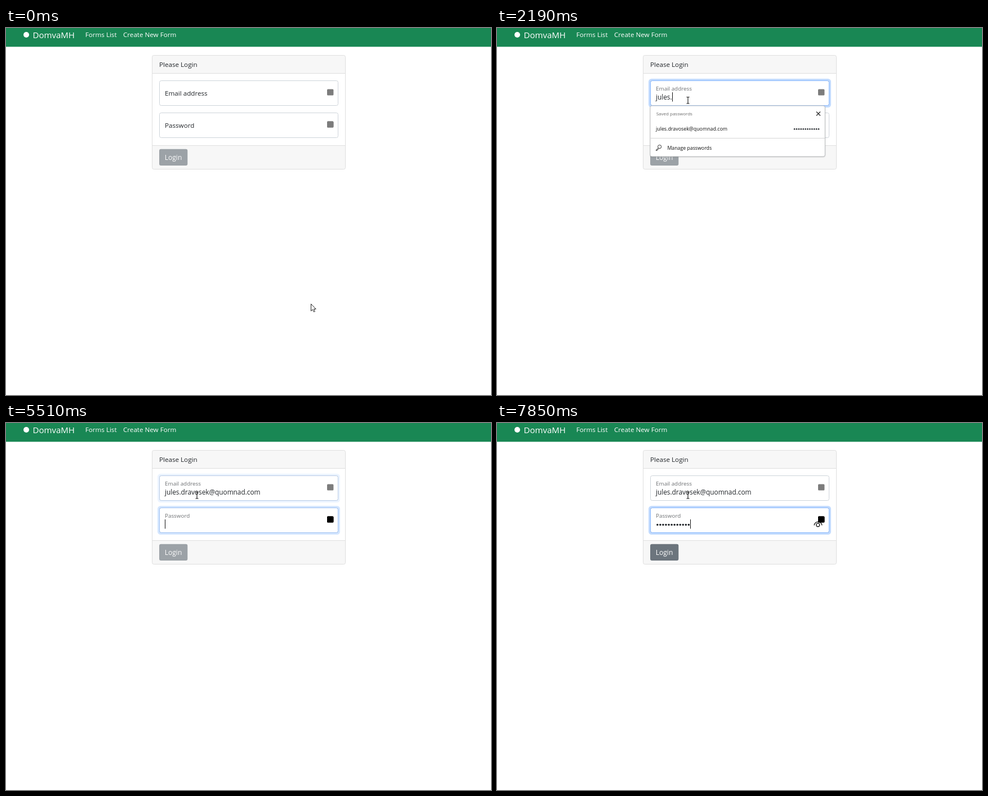
These frames come from a looping animation (861 px wide and 651 px high, 8000 ms). An HTML page:

```html
<!DOCTYPE html>
<html lang="en">
<head>
<meta charset="utf-8">
<title>Login form</title>
<style>
  html, body { margin: 0; width: 100%; height: 100%; overflow: hidden; background: #fff; }
  svg { display: block; width: 100%; height: 100%; }
  text { font-family: 'Open Sans', 'Noto Sans', sans-serif; font-size: 11.65px; fill: #212529; white-space: pre; }
</style>
</head>
<body>
<svg id="stage" viewBox="0 0 861 651"></svg>
<script>
const LOOP = 8000;
const EMAIL = 'jules.dravosek@quomnad.com';
const ALT_EMAIL = 'jules@dravosek.net';
const svg = document.getElementById('stage');

const text = (x, y, str, attrs = '') => `<text x="${x}" y="${y}" ${attrs}>${str}</text>`;
const rect = (x, y, w, h, attrs) => `<rect x="${x}" y="${y}" width="${w}" height="${h}" ${attrs}/>`;
const dots = (n, x, y, gap, r) => Array.from({ length: n },
  (_, i) => `<circle cx="${x + i * gap}" cy="${y}" r="${r}" fill="#212529"/>`).join('');

const field = (id, y, label) => `
  ${rect(269, y - 3, 324, 51, `id="${id}Ring" rx="5.5" fill="#c2dbfe"`)}
  ${rect(272.5, y + .5, 317, 44, 'rx="3" fill="#fff" stroke="#ced4da"')}
  ${rect(272.5, y + .5, 317, 44, `id="${id}Edge" rx="3" fill="none" stroke="#86b7fe"`)}
  ${text(282, y + 27, label, `id="${id}Label"`)}
  ${rect(570, y + 15.5, 11.4, 11, `id="${id}Icon" rx="1.5" fill="#7c7c7c"`)}`;

const savedRow = (id, y, str, n) => `<g id="${id}">
  ${text(282, y, str, 'style="font-size:8.85px;fill:#111"')}
  ${dots(n, 571 - (n - 1) * 3.9, y - 2.8, 3.9, 1.3)}</g>`;

svg.innerHTML = `
  <defs><filter id="soft" x="-5%" y="-10%" width="110%" height="125%">
    <feGaussianBlur stdDeviation="1.2"/></filter></defs>
  ${rect(0, 0, 861, 33.3, 'fill="#198754"')}
  <circle cx="36" cy="12" r="5" fill="#fff"/>
  ${text(47.5, 18, 'DomvaMH', 'style="font-size:15px;fill:#fff"')}
  ${text(140.7, 16.3, 'Forms List', 'style="fill:#fff"')}
  ${text(208, 16.3, 'Create New Form', 'style="fill:#fff"')}

  ${rect(259.5, 48.5, 343, 202, 'rx="3" fill="#f7f7f7" stroke="#dfdfdf"')}
  ${rect(260, 80, 342, 128.5, 'fill="#fff"')}
  <path d="M260 80.5H602M260 208.5H602" stroke="#dfdfdf"/>
  ${text(272, 69, 'Please Login')}
  ${field('mail', 93, 'Email address')}
  ${text(282, 127, '', 'id="typed" style="font-size:11.8px"')}
  ${field('pass', 150, 'Password')}
  <g id="secret"></g>
  <g id="eye" fill="none" stroke="#111" stroke-width="1.2">
    <path d="M563 181.5C564 177 567 175.3 570 175.3S576 177 577 181.5"/>
    <circle cx="569.8" cy="180.8" r="3"/>
  </g>
  <use href="#passIcon"/>
  <g id="button">
    ${rect(272, 214.7, 50.3, 29.3, 'rx="3" fill="#6c757d"')}
    ${text(281.8, 234, 'Login', 'style="font-size:12px;fill:#fff"')}
  </g>

  <g id="popup">
    ${rect(272, 139, 310.5, 116, 'id="shade" rx="3" fill="#000" opacity=".22" filter="url(#soft)"')}
    ${rect(271.9, 137.9, 310.4, 116.4, 'id="panel" rx="3" fill="#fff" stroke="#b4b6b8" stroke-width=".9"')}
    ${text(282.7, 155, 'Saved passwords', 'style="font-size:8px;fill:#6b6b6b"')}
    <path d="M567 148.5l7 7m0-7l-7 7" stroke="#222" stroke-width="1.1"/>
    ${savedRow('altRow', 182, ALT_EMAIL, 8)}
    ${savedRow('mainRow', 208.4, EMAIL, 12)}
    <g id="manage">
      <path d="M272.5 221.5H582" stroke="#d6d6d6"/>
      <g fill="none" stroke="#333" stroke-width="1">
        <circle cx="288.6" cy="236.6" r="3.1"/>
        <path d="M286.2 238.8L282.3 242.6V243.3H284.2V241.9H285.6L287.6 239.7"/>
      </g>
      ${text(302.4, 241.6, 'Manage passwords', 'style="font-size:8.78px;fill:#111"')}
    </g>
  </g>

  ${rect(282, 114, 1, 16.5, 'id="caret" fill="#111"')}
  <g id="pointer">
    <path id="arrow" d="M.5 .5V13L3.4 10.3L5.4 14.6L7.4 13.7L5.5 9.5H9.2Z" fill="#fff" stroke="#222" stroke-width="1"/>
    <path id="beam" d="M-2.5 -5.5H-1L0 -5L1 -5.5H2.5M0 -5V5.5M-2.5 6H-1L0 5.5L1 6H2.5" fill="none" stroke="#111" stroke-width="1.1"/>
  </g>`;

const el = {};
svg.querySelectorAll('[id]').forEach(n => el[n.id] = n);

const set = (node, attrs) => { for (const k in attrs) node.setAttribute(k, attrs[k]); };
const show = (node, on) => set(node, { visibility: on ? 'visible' : 'hidden' });
const lerp = (a, b, p) => a + (b - a) * p;
const ease = (t, start, dur) => {
  const p = Math.min(1, Math.max(0, (t - start) / dur));
  return p * p * (3 - 2 * p);
};
const spread = (n, from, to) => Array.from({ length: n }, (_, i) => Math.round(from + (to - from) * i / (n - 1)));
const count = (times, t) => times.filter(k => k <= t).length;

const NARROW = 2190;
const TAB = 5410;
const mailKeys = [
  ...spread(6, 1580, 2110), ...spread(3, 2270, 2590), ...spread(5, 2650, 3290),
  ...spread(9, 3670, 4640), ...spread(3, 4790, 4940)];
const passKeys = [5910, ...spread(5, 6040, 6830), ...spread(6, 6980, 7850)];

function tick(t) {
  if (t < 70) return 0;
  if (t < 730) return 70 + Math.floor((t - 70) / 73.4) * 73.4;
  if (t < 820) return 730;
  if (t >= TAB && t < 5580) return TAB + Math.floor((t - TAB) / 85) * 85;
  return t;
}

function drawField(id, y, focus, float) {
  set(el[id + 'Ring'], { opacity: focus });
  set(el[id + 'Edge'], { opacity: focus });
  const label = el[id + 'Label'];
  set(label, { y: lerp(y + 27, y + 18, float), opacity: lerp(1, .65, float) });
  label.style.fontSize = lerp(11.65, 9.85, float) + 'px';
}

function drawPointer(q) {
  const p = ease(q, 0, 600);
  const x = lerp(541, 339, p), y = lerp(489, 128, p);
  const overInput = y < 138 || (y > 150 && y < 195);
  set(el.pointer, { transform: `translate(${x} ${y})` });
  show(el.arrow, !overInput);
  show(el.beam, overInput);
}

function drawPopup(t) {
  el.popup.style.display = t >= 730 && t < TAB ? '' : 'none';
  const narrow = t >= NARROW;
  const lift = narrow ? -26.3 : 0;
  el.altRow.style.display = narrow ? 'none' : '';
  set(el.panel, { height: 116.4 + lift });
  set(el.shade, { height: 116 + lift });
  set(el.mainRow, { transform: `translate(0 ${lift})` });
  set(el.manage, { transform: `translate(0 ${narrow ? -26 : 0})` });
}

function draw(t) {
  const q = tick(t);
  const onPass = t >= TAB;
  const chars = count(mailKeys, t), hidden = count(passKeys, t);

  drawPointer(q);
  drawField('mail', 93, onPass ? 1 - ease(q, 5400, 150) : ease(q, 645, 150), ease(q, 640, 105));
  drawField('pass', 150, ease(q, 5400, 150), ease(q, 5400, 100));
  set(el.passIcon, { fill: onPass ? '#000' : '#7c7c7c' });
  drawPopup(t);

  el.typed.textContent = EMAIL.slice(0, chars);
  el.secret.innerHTML = dots(hidden, 284.8, 180.6, 5.05, 1.75);
  show(el.eye, hidden > 0);
  set(el.button, { opacity: hidden ? 1 : .65 });

  const width = chars ? el.typed.getComputedTextLength() : 0;
  set(el.caret, {
    x: Math.round(282 + (onPass ? hidden * 5.05 : width)),
    y: onPass ? 171 : 114
  });
  show(el.caret, q >= 650 && !(t >= 1200 && t < mailKeys[0]));
}

const start = performance.now();
function frame() {
  draw((performance.now() - start) % LOOP);
  requestAnimationFrame(frame);
}
frame();
</script>
</body>
</html>
```
